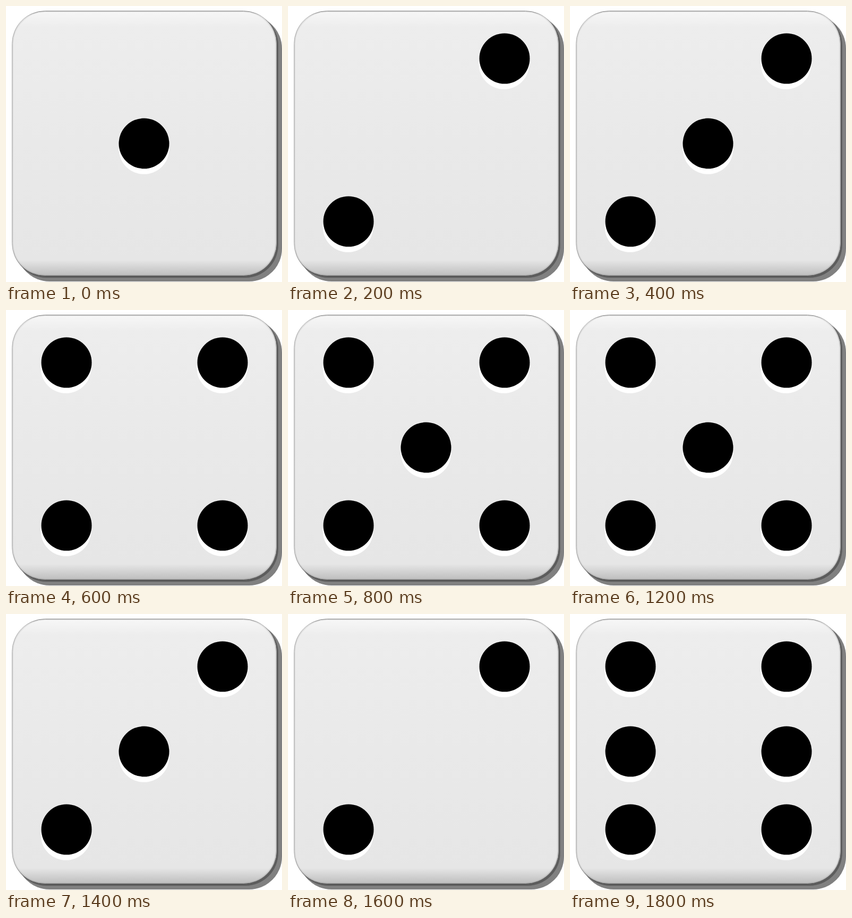
Write an HTML page that moves like this. It is 520 px wide and 520 px high and loops after 2 s.

```html
<!DOCTYPE html>
<html lang="en">
<head>
<meta charset="utf-8">
<title>Rolling die</title>
<style>
  html, body { margin: 0; width: 100%; height: 100%; overflow: hidden; background: #fff; }
  svg { display: block; width: 520px; height: 520px; }
</style>
</head>
<body>
<svg id="die" viewBox="0 0 520 520">
  <defs>
    <linearGradient id="body" x1="0" y1="0" x2="0" y2="1">
      <stop offset="0" stop-color="#f7f7f7"/>
      <stop offset=".06" stop-color="#ededed"/>
      <stop offset=".5" stop-color="#e9e9e9"/>
      <stop offset=".94" stop-color="#e6e6e6"/>
      <stop offset="1" stop-color="#bdbdbd"/>
    </linearGradient>
    <linearGradient id="rim" x1="0" y1="0" x2="0" y2="1">
      <stop offset="0" stop-color="#777"/>
      <stop offset=".02" stop-color="#aaa"/>
      <stop offset=".9" stop-color="#a8a8a8"/>
      <stop offset="1" stop-color="#555"/>
    </linearGradient>
    <filter id="soft"><feGaussianBlur stdDeviation=".6"/></filter>
  </defs>
  <g filter="url(#soft)">
    <rect x="20" y="18" width="500" height="501" rx="62" fill="#808080"/>
    <rect x="14" y="12" width="499" height="500" rx="62" fill="#5c5c5c"/>
  </g>
  <rect x="11.5" y="9.5" width="498" height="499" rx="62" fill="url(#body)" stroke="url(#rim)"/>
  <rect x="13" y="11" width="495" height="496" rx="60.5" fill="none" stroke="#000" stroke-opacity=".07" stroke-width="2"/>
</svg>
<script>
const NS = 'http://www.w3.org/2000/svg';
const STEP = 200;
const ROLL = '1234565326';
const R = 47.5, GAP = 147, DROP = 10.3;

const die = document.getElementById('die');

function add(parent, tag, attrs = {}) {
  const el = document.createElementNS(NS, tag);
  for (const key in attrs) el.setAttribute(key, attrs[key]);
  return parent.appendChild(el);
}

// A black pip over its white lower lip; col and row run from -1 to 1
function addPip(col, row) {
  const x = 260 + GAP * col;
  const y = 259 + (row < 0 ? 160 : GAP) * row;
  const g = add(die, 'g');
  add(g, 'circle', { cx: x, cy: y + DROP, r: R, fill: '#fff' });
  add(g, 'circle', { cx: x + Math.abs(col), cy: y, r: R });
  return g;
}

function isLit(value, col, row) {
  if (col === 0) return value % 2 === 1;
  if (row === 0) return value === 6;
  return value >= (col === row ? 4 : 2);
}

const pips = [];
for (const col of [-1, 0, 1]) {
  for (const row of col ? [-1, 0, 1] : [0]) {
    pips.push({ col, row, el: addPip(col, row) });
  }
}

function draw(time) {
  const value = Number(ROLL[Math.floor(time / STEP) % ROLL.length]);
  for (const { col, row, el } of pips) {
    el.style.visibility = isLit(value, col, row) ? 'visible' : 'hidden';
  }
}

let start;
function tick(now) {
  start ??= now;
  draw(now - start);
  requestAnimationFrame(tick);
}
draw(0);
requestAnimationFrame(tick);
</script>
</body>
</html>
```
